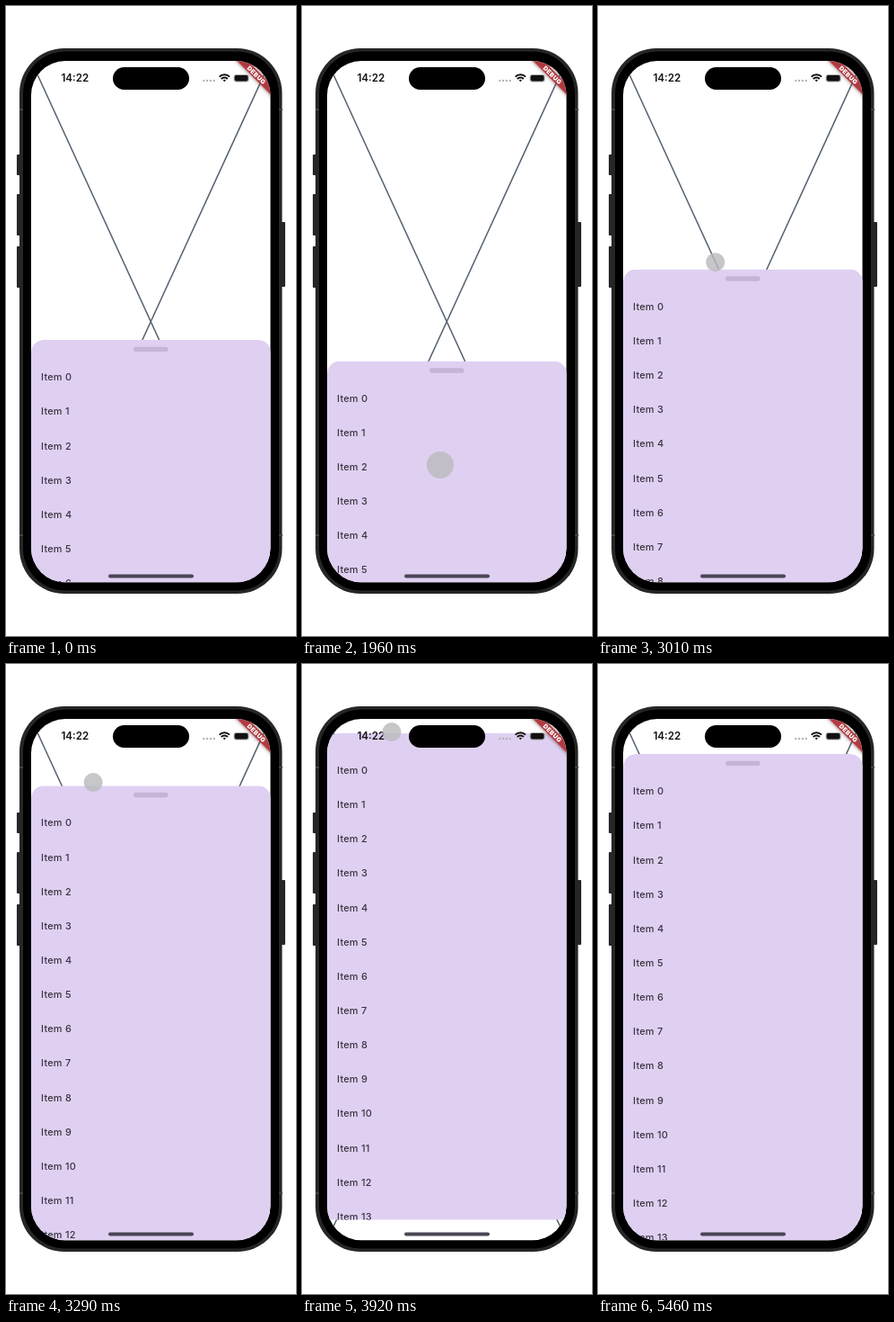
Recreate the animation shown at these times as an HTML page. Size 323 px wide and 700 px high, loop 6020 ms.

```html
<!DOCTYPE html>
<html lang="en">
<head>
<meta charset="utf-8">
<title>Bottom sheet drag</title>
<style>
  html, body { margin: 0; width: 100%; height: 100%; overflow: hidden; background: #fff; }
  svg { display: block; font-family: Inter, Roboto, sans-serif; }
  .item { font-size: 10.9px; font-weight: 500; letter-spacing: .25px; fill: #39333f; }
</style>
</head>
<body>
<svg width="323" height="700" viewBox="0 0 323 700">
  <defs>
    <clipPath id="screen"><rect x="28" y="61" width="266.5" height="579.3" rx="38"/></clipPath>
    <clipPath id="panel"><path id="shape" d="M28 541V14a14 14 0 0 1 14-14H281a14 14 0 0 1 14 14V541Z"/></clipPath>
    <filter id="shade" x="-20%" y="-100%" width="140%" height="300%">
      <feDropShadow dx="0" dy="0" stdDeviation="2" flood-opacity=".5"/>
    </filter>
    <filter id="soft" filterUnits="userSpaceOnUse" x="19" y="50" width="285" height="600" color-interpolation-filters="sRGB">
      <feGaussianBlur stdDeviation=".45"/>
    </filter>
  </defs>

  <!-- phone body and buttons -->
  <g fill="#262626">
    <rect x="12" y="165" width="6" height="23" rx="1"/>
    <rect x="12" y="209" width="6" height="46" rx="1"/>
    <rect x="12" y="267" width="6" height="46" rx="1"/>
    <rect x="304" y="240" width="7" height="72" rx="1"/>
    <rect x="15" y="47" width="292.5" height="606" rx="50"/>
  </g>
  <path d="M15 115h4M304 115h4M15 588h4M304 588h4" stroke="#444" stroke-width="2"/>
  <rect x="19" y="50.5" width="285" height="599" rx="47"/>

  <g filter="url(#soft)"><g clip-path="url(#screen)">
    <rect x="28" y="61" width="267" height="580" fill="#fff"/>
    <path d="M28 61 294.5 640.3M294.5 61 28 640.3" stroke="#55616f" stroke-width="1.5"/>
    <g id="sheet">
      <g clip-path="url(#panel)">
        <use href="#shape" fill="#dfd0f2"/>
        <rect x="142" y="7.7" width="38.5" height="5.4" rx="2.7" fill="#c4b5d5"/>
        <g id="items"></g>
      </g>
    </g>
    <g transform="translate(279 76.8) rotate(45)">
      <rect x="-40" y="-4.3" width="80" height="8.6" fill="#b03b40" filter="url(#shade)"/>
      <text y="2.5" text-anchor="middle" font-size="6.9" font-weight="900" letter-spacing=".4" fill="#fff">DEBUG</text>
    </g>
    <text x="76.8" y="84.2" text-anchor="middle" font-size="11.6" font-weight="600" fill="#111">14:22</text>
    <path d="M220.3 83h12" stroke="#b5b2b9" stroke-width="2.4" stroke-linecap="round" stroke-dasharray="0 3.8"/>
    <g fill="none" stroke="#111" stroke-width="1.9">
      <path d="M237.6 78.7a8 8 0 0 1 11.4 0M239.7 81a5 5 0 0 1 7.2 0"/>
      <path d="M243.3 84.2l-1.6-1.7a2.3 2.3 0 0 1 3.2 0Z" fill="#111" stroke="none"/>
    </g>
    <rect x="253.6" y="76" width="17" height="8.4" rx="2.7" fill="#aaa"/>
    <rect x="254.7" y="77" width="14.8" height="6.4" rx="1.8" fill="#111"/>
    <rect x="119" y="68" width="85" height="25" rx="12.5"/>
    <rect x="114" y="631.5" width="95" height="4" rx="2" fill="#4b4554"/>
  </g></g>
  <circle id="touch" fill="#b9b9bc"/>
</svg>
<script>
const LOOP = 6020, STEP = 70;
const REST = 371, TOP = 100, GRIP = 11;
const DROP = 1820, GRAB = 2730, LET_GO = 4290;

const HOME = { x: 122, y: 216 };
const MOVES = [
  { from: 420, to: 1120, x: 140, y: 378 },
  { from: 1190, to: 1610, x: 154, y: 513 },
  { from: 1890, to: 2660, x: 152, y: 382 },
  { from: GRAB, to: 3440, x: 90, y: 99 },
  { from: 3440, to: 4270, x: 106, y: 61 }
];

const $ = id => document.getElementById(id);
const ramp = (t, from, to) => Math.min(1, Math.max(0, (t - from) / (to - from)));
const ease = u => u * u * (3 - 2 * u);

$('items').innerHTML = Array.from({ length: 14 }, (_, i) =>
  `<text class="item" x="39" y="${45.2 + i * 38.15}">Item ${i}</text>`).join('');

function finger(t) {
  let { x, y } = HOME;
  for (const m of MOVES) {
    const s = ease(ramp(t, m.from, m.to));
    x += (m.x - x) * s;
    y += (m.y - y) * s;
  }
  return { x, y };
}

// the dot shrinks while it presses
const press = (t, down, up) => ramp(t, down, down + 140) - ramp(t, up, up + 140);
const radius = t => 15 - 4.5 * (press(t, 1050, 1750) + press(t, 2590, 4270));
const opacity = t => .8 * (ramp(t, 70, 350) - ramp(t, 4270, 4550));

// critically damped return to zero
const spring = dt => (1 + .012 * dt) * Math.exp(-.012 * dt);

// the sheet trails the finger slightly and resists past both ends
function dragged(t) {
  const y = finger(t - 34).y - GRIP;
  if (y < TOP) return TOP - .7 * (TOP - y);
  return y > REST ? REST + .36 * (y - REST) : y;
}

function sheetTop(t) {
  if (t < DROP) return dragged(t);
  if (t < GRAB) return REST + (dragged(DROP) - REST) * spring(t - DROP);
  if (t < LET_GO) return dragged(t);
  return TOP + (dragged(LET_GO) - TOP) * spring(t - LET_GO);
}

function draw(now) {
  const t = Math.floor(now % LOOP / STEP) * STEP;
  const { x, y } = finger(t);
  const dot = { cx: x, cy: y, r: radius(t), opacity: opacity(t) };
  for (const name in dot) $('touch').setAttribute(name, dot[name]);
  // before the first press the sheet rests
  const top = t < 1190 ? REST : sheetTop(t);
  $('sheet').setAttribute('transform', `translate(0 ${top.toFixed(2)})`);
}

const start = performance.now();
function tick() {
  draw(performance.now() - start);
  requestAnimationFrame(tick);
}
tick();
</script>
</body>
</html>
```
